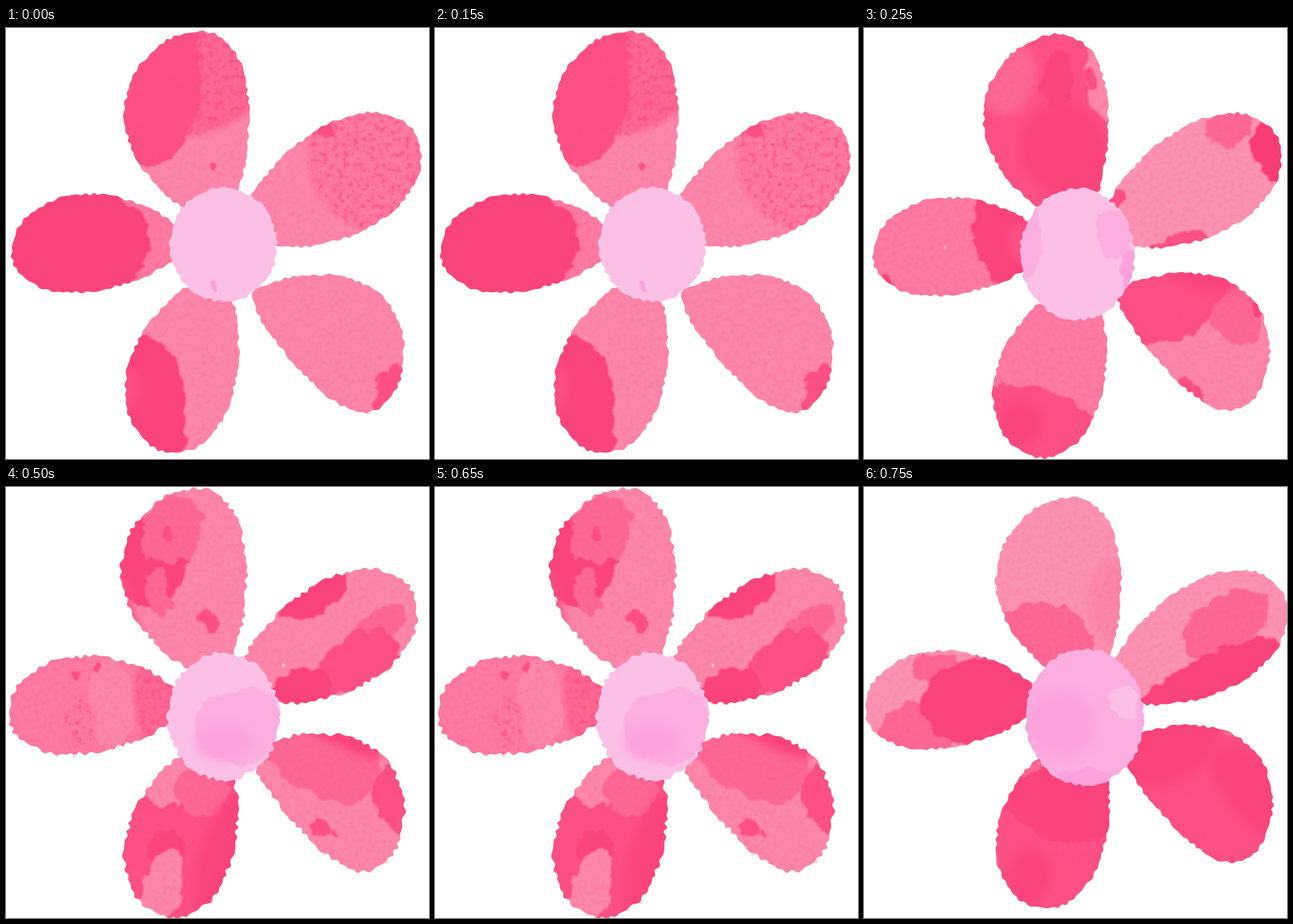
Recreate the animation shown at these times as an HTML page. Size 741 px wide and 756 px high, loop 1 s.

```html
<!DOCTYPE html>
<html>
<head>
<meta charset="utf-8">
<title>Watercolour flower</title>
<style>
  html, body { margin: 0; width: 100%; height: 100%; overflow: hidden; background: #fff; }
  svg { display: block; width: 741px; height: 756px; }
</style>
</head>
<body>
<svg id="stage" viewBox="0 0 741 756">
  <defs>
    <filter id="edge" x="-20%" y="-20%" width="140%" height="140%" color-interpolation-filters="sRGB">
      <feTurbulence type="fractalNoise" baseFrequency=".035" numOctaves="3" seed="4"/>
      <feColorMatrix values="1 0 0 0 0  0 1 0 0 0  0 0 1 0 0  0 0 0 0 1" result="noise"/>
      <feDisplacementMap in="SourceGraphic" in2="noise" scale="26" xChannelSelector="R" yChannelSelector="G"/>
      <feGaussianBlur stdDeviation=".8"/>
    </filter>
    <filter id="soft" x="-30%" y="-30%" width="160%" height="160%" color-interpolation-filters="sRGB">
      <feGaussianBlur stdDeviation="8"/>
    </filter>
    <filter id="grain" x="-10%" y="-10%" width="120%" height="120%" color-interpolation-filters="sRGB">
      <feGaussianBlur in="SourceGraphic" stdDeviation="5" result="wash"/>
      <feTurbulence type="fractalNoise" baseFrequency=".11" numOctaves="2" seed="8"/>
      <feColorMatrix values="0 0 0 0 .985  0 0 0 0 .31  0 0 0 0 .51  2.6 0 0 0 -1.25"/>
      <feComposite in2="wash" operator="in" result="specks"/>
      <feMerge><feMergeNode in="wash"/><feMergeNode in="specks"/></feMerge>
    </filter>
    <filter id="paper" x="0" y="0" width="100%" height="100%" color-interpolation-filters="sRGB">
      <feTurbulence type="fractalNoise" baseFrequency=".12" numOctaves="3" seed="2"/>
      <feColorMatrix values="0 0 0 0 .98  0 0 0 0 .27  0 0 0 0 .5  .35 0 0 0 -.15"/>
      <feComposite in2="SourceAlpha" operator="in" result="tint"/>
      <feMerge><feMergeNode in="SourceGraphic"/><feMergeNode in="tint"/></feMerge>
    </filter>
  </defs>
</svg>
<script>
const NS = 'http://www.w3.org/2000/svg';
const stage = document.getElementById('stage');
const defs = stage.querySelector('defs');
const paint = {
  k: '#fd93b3', l: '#fd87aa', n: '#fd7aa2', m: '#fc6894', h: '#fc5186', d: '#fc447c', x: '#fb3d76',
  p: '#fcc0e5', r: '#fcaedf', q: '#fca2da', w: '#fff'
};

// A petal is a teardrop from root to tip; bend bows its axis to one side.
const petals = {
  top:   { root: [372, 345], tip: [325, 7],   width: 110, bend: -29 },
  right: { root: [405, 365], tip: [718, 188], width: 97,  bend: 4 },
  lower: { root: [432, 462], tip: [672, 650], width: 98,  bend: -37 },
  base:  { root: [372, 430], tip: [275, 742], width: 95,  bend: 8 },
  left:  { root: [325, 375], tip: [10, 395],  width: 86,  bend: 10 }
};

// Each petal: shift, colour, then washes as [style, along, across, half-length, half-width],
// measured in the petal's own length and width. Styles ending in ~ are soft, in * grainy.
const poses = [
  { ripple: 2,
    top: [[0, 0], 'l', ['m*', .8, 0, .33, 1.5], ['h', .76, -.75, .42, 1], ['h', .31, .25, .025, .06]],
    right: [[0, 0], 'l', ['n*', .72, 0, .28, 1.2], ['h', .63, -.95, .04, .12]],
    lower: [[0, 0], 'l', ['h', .98, -.1, .1, .45]],
    base: [[0, 0], 'l', ['d', 1, .75, .56, 1.1], ['h~', .75, .9, .12, .2]],
    left: [[0, 0], 'n', ['d', .72, 0, .48, 1.3], ['w', .6, -.05, .006, .02]],
    heart: [[381, 380], 'p', ['q', -.2, .7, .08, .1]], size: [94, 100] },
  { ripple: 2,
    top: [[2, 5], 'h', ['m~', .8, -.6, .18, .45], ['l', .88, .95, .35, .33], ['d', .76, .2, .14, .25],
      ['d~', .4, .2, .25, .7], ['h', .75, .72, .05, .08]],
    right: [[4, 1], 'k', ['m', .82, -.6, .12, .35], ['x', .97, .25, .12, .6], ['h', .27, .95, .2, .35],
      ['h', .12, -.5, .1, .15]],
    lower: [[13, -3], 'l', ['m', .6, -.6, .2, .45], ['h', .2, -.3, .32, 1.2], ['d~', .27, -1, .25, .5],
      ['d', .7, -1.1, .06, .25], ['h', .7, 1, .1, .2]],
    base: [[17, 8], 'n', ['h', 1, 0, .36, 1.7], ['d~', .85, .3, .12, .4], ['d', .27, -1, .08, .15]],
    left: [[6, 6], 'n', ['d', .2, .3, .24, 1.2], ['h~', .15, 0, .1, .4], ['d', .95, -.6, .07, .2],
      ['w', .61, 0, .013, .03]],
    heart: [[374, 397], 'p', ['r', -.9, -.3, .25, .7], ['r', .65, -.3, .32, .4], ['q', .95, .3, .2, .4]],
    size: [100, 116] },
  { ripple: 3, rings: 2,
    top: [[-5, -4], 'l', ['d', .66, -.6, .23, .65], ['m', .8, -.2, .17, .5], ['m', .49, -.45, .12, .18],
      ['h', .79, -.25, .03, .07], ['h', .31, .25, .06, .15], ['h~', .4, -1, .25, .12]],
    right: [[-7, -5], 'l', ['d', .57, -.85, .18, .35], ['m', .8, .2, .12, .28], ['h', .6, .6, .22, .5],
      ['d', .28, .6, .16, .45], ['w', .28, 0, .008, .03]],
    lower: [[0, 0], 'l', ['m', .35, -.4, .33, .75], ['d~', .3, -1, .3, .35], ['h', .85, -.75, .2, .5],
      ['h', .58, .7, .07, .15], ['h', .66, .6, .02, .05]],
    base: [[-2, 10], 'h', ['l', .3, .55, .14, .45], ['m', .3, -.1, .14, .5], ['d~', .6, -.8, .35, .4],
      ['d', .65, .2, .1, .35], ['l', .85, .1, .2, .35]],
    left: [[-5, 5], 'n', ['l', .43, 0, .13, .9], ['m*', .15, 0, .14, 1.2], ['n*', .61, -.4, .08, .6],
      ['h', .61, .6, .03, .1], ['h', .5, .75, .03, .12]],
    heart: [[381, 403], 'p', ['r', .3, .15, .8, .6], ['q~', 0, .4, .5, .3]], size: [98, 112] },
  { ripple: 2,
    top: [[24, 12], 'k', ['l~', .4, .9, .25, .5], ['m', .28, -.45, .21, .8]],
    right: [[15, -3], 'k', ['m', .68, -.05, .24, .5], ['d', .45, .75, .42, .5]],
    lower: [[18, -15], 'h', ['d~', .2, -.3, .25, 1], ['d~', .75, -.5, .3, .5], ['m', .42, -1, .06, .1]],
    base: [[22, -6], 'h', ['d', .35, 0, .27, 1.3], ['d~', .85, .2, .15, .4], ['m', .25, .85, .1, .25],
      ['m', .82, 1, .07, .15]],
    left: [[-8, -4], 'k', ['m', .72, -.6, .22, .6], ['m', .6, .65, .13, .3], ['h', .27, .9, .1, .15],
      ['d', .33, -.1, .36, .9]],
    heart: [[387, 404], 'r', ['q~', -.4, .1, .6, .5], ['p', .65, -.2, .25, .25], ['q', .1, .95, .6, .2]],
    size: [104, 120] }
];

const make = (tag, attrs, parent) => {
  const el = document.createElementNS(NS, tag);
  for (const name in attrs) el.setAttribute(name, attrs[name]);
  return parent.appendChild(el);
};

let seed = 7;
const random = () => (seed = seed * 16807 % 2147483647) / 2147483647;

const loop = (count, point) => Array.from({ length: count }, (_, i) => point(2 * Math.PI * i / count));
const toPath = points => 'M' + points.map(p => p.map(v => v.toFixed(1)).join(' ')).join('L') + 'Z';

// Both frames map (along, across) to the stage and give an outline in those units.
function petalFrame({ root, tip, width, bend }, [dx, dy]) {
  const ax = tip[0] - root[0], ay = tip[1] - root[1], length = Math.hypot(ax, ay);
  const place = (t, s) => {
    const side = (s * width + bend * 4 * t * (1 - t)) / length;
    return [root[0] + dx + ax * t - ay * side, root[1] + dy + ay * t + ax * side];
  };
  const outline = loop(420, a => {
    const t = (1 - Math.cos(a)) / 2;
    const half = t ** .75 * Math.sqrt(1 - t) / .431;
    return place(t, a < Math.PI ? -half : half);
  });
  return { place, outline };
}

function heartFrame([cx, cy], [rx, ry]) {
  const place = (t, s) => [cx + rx * t, cy + ry * s];
  return { place, outline: loop(320, a => place(Math.cos(a), Math.sin(a))) };
}

// Uneven bumps along the edge, like wet paint drying.
function ragged(points, ripple) {
  const phase = random() * 100;
  let run = 0;
  return points.map(([x, y], i) => {
    const [px, py] = points.at(i - 1), [nx, ny] = points[(i + 1) % points.length];
    const size = Math.hypot(nx - px, ny - py) || 1;
    run += Math.hypot(x - px, y - py);
    const at = run + phase;
    const bump = ripple * (Math.sin(at / 3.2 + 1.8 * Math.sin(at / 17)) * (.6 + .4 * Math.sin(at / 11)) + .5 * Math.sin(at / 13));
    return [x + bump * (ny - py) / size, y - bump * (nx - px) / size];
  });
}

let clips = 0;
function drawShape({ place, outline }, [, base, ...washes], { ripple, rings = 0 }, parent, isPetal) {
  const edge = ragged(outline, ripple);
  const d = toPath(edge), id = 'clip' + clips++;
  make('path', { d }, make('clipPath', { id }, defs));
  const texture = make('g', isPetal ? { filter: 'url(#paper)' } : {}, parent);
  const shape = make('g', { 'clip-path': `url(#${id})` }, texture);
  make('path', { d, fill: paint[base] }, shape);
  for (const [style, t, s, rt, rs] of washes) {
    const blob = loop(60, a => place(t + rt * Math.cos(a), s + rs * Math.sin(a)));
    const filter = { '~': 'soft', '*': 'grain' }[style[1]] || 'edge';
    make('path', { d: toPath(blob), fill: paint[style[0]], filter: `url(#${filter})` }, shape);
  }
  for (let i = 0; isPetal && i < rings; i++) {
    const [cx, cy] = edge[Math.floor(random() * edge.length)];
    make('circle', { cx, cy, r: 2 + random() * 1.5, fill: 'none', stroke: paint.m, 'stroke-width': .8 }, parent);
  }
}

const layers = poses.map(pose => {
  const layer = make('g', {}, stage);
  for (const name in petals) drawShape(petalFrame(petals[name], pose[name][0]), pose[name], pose, layer, true);
  drawShape(heartFrame(pose.heart[0], pose.size), pose.heart, pose, layer, false);
  return layer;
});

function show(time) {
  const current = Math.floor(time % 1000 / 250);
  layers.forEach((layer, i) => layer.setAttribute('display', i === current ? 'inline' : 'none'));
}

let start;
function tick(now) {
  start ??= now;
  show(now - start);
  requestAnimationFrame(tick);
}
show(0);
requestAnimationFrame(tick);
</script>
</body>
</html>
```
